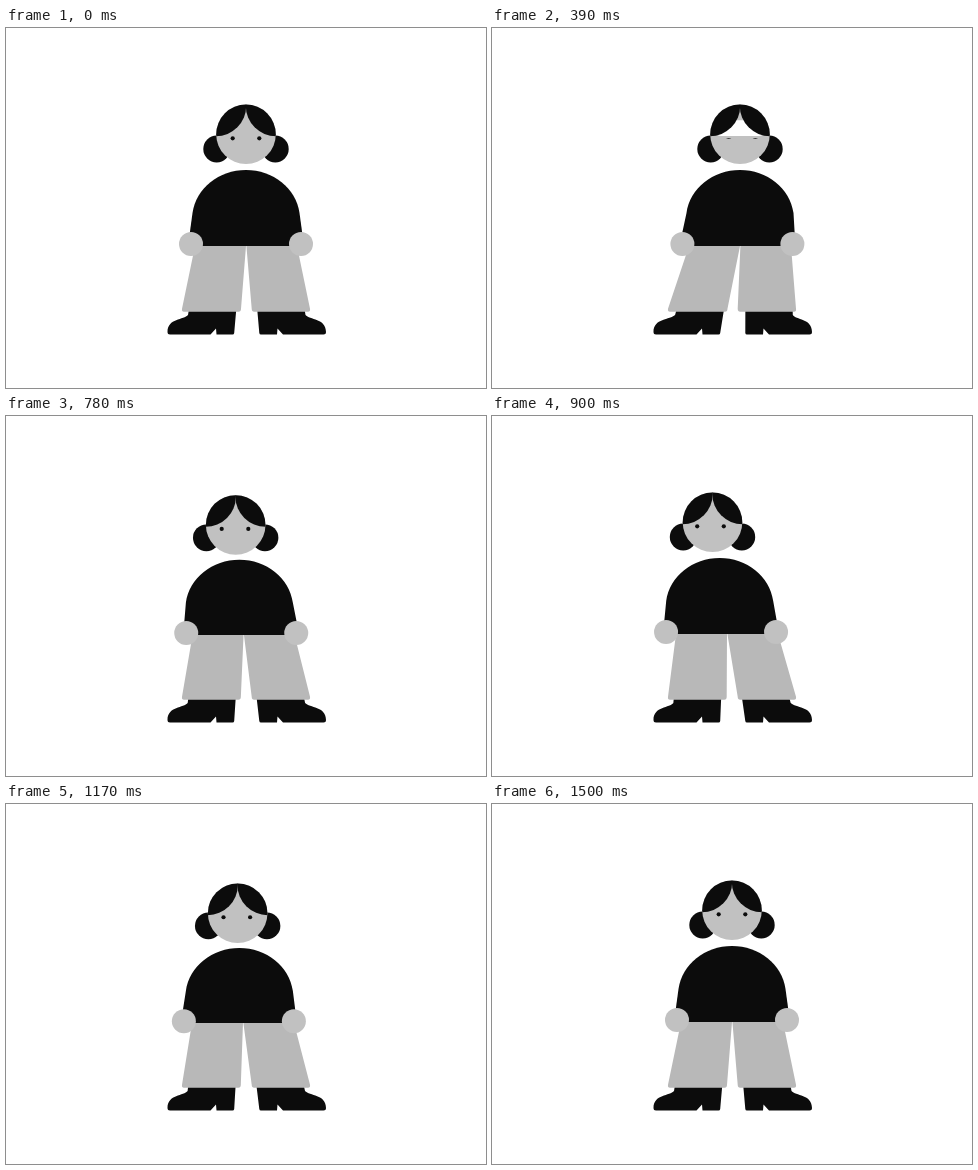
An HTML page with a canvas for the animation above (1530 ms loop, 480 by 360 pixels).

```html
<!DOCTYPE html>
<html lang="en">
<head>
<meta charset="utf-8">
<title>Swaying figure</title>
<style>
  html, body { margin: 0; width: 480px; height: 360px; overflow: hidden; background: #fff; }
  canvas { display: block; }
</style>
</head>
<body>
<canvas id="stage" width="480" height="360"></canvas>
<script>
const ctx = document.getElementById('stage').getContext('2d');
const LOOP = 1530, STEP = 30, MOVE = 310;
const BLACK = '#0c0c0c', SKIN = '#c1c1c1', CLOTH = '#b8b8b8', WHITE = '#fff';

const clamp = v => Math.max(0, Math.min(1, v));
const smooth = v => v * v * (3 - 2 * v);
const mix = (a, b, v) => a + (b - a) * v;

// Centre, lean right, lean left, centre; each part has its own start times.
function sway(t, right, left, starts) {
  const [a, b, c] = starts.map(s => smooth(clamp((t - s) / MOVE)));
  return right * a + (left - right) * b - left * c;
}

function dip(t) {
  return [0, 590, 1000].reduce((sum, s) =>
    sum + Math.sin(Math.PI * clamp((t - s) / MOVE)) ** 2, 0);
}

function circle(x, y, r, color) {
  ctx.fillStyle = color;
  ctx.beginPath();
  ctx.arc(x, y, r, 0, Math.PI * 2);
  ctx.fill();
}

function mirrored(draw) {
  draw();
  ctx.save();
  ctx.translate(481.5, 0);
  ctx.scale(-1, 1);
  draw(true);
  ctx.restore();
}

function shoe(shift) {
  ctx.fillStyle = BLACK;
  ctx.beginPath();
  ctx.moveTo(183 + shift, 281);
  ctx.lineTo(182 + shift * 0.6, 287);
  ctx.bezierCurveTo(178, 292, 161.5, 290, 161.5, 304);
  ctx.quadraticCurveTo(161.5, 306.5, 164, 306.5);
  ctx.lineTo(204.5, 306.5);
  ctx.lineTo(210, 300.5);
  ctx.lineTo(210.5, 306.5);
  ctx.lineTo(226.5, 306.5);
  ctx.quadraticCurveTo(228, 306.5, 228.2, 305);
  ctx.lineTo(230.3 + shift, 281);
  ctx.fill();
}

function leg(topOuter, topInner, bottomOuter, bottomInner, waist) {
  const y = 283.8, d = Math.sign(bottomInner - bottomOuter) * 2.5;
  ctx.fillStyle = CLOTH;
  ctx.beginPath();
  ctx.moveTo(topOuter, waist);
  ctx.lineTo(bottomOuter + d * 0.2, y - 3);
  ctx.quadraticCurveTo(bottomOuter, y, bottomOuter + d, y);
  ctx.lineTo(bottomInner - d, y);
  ctx.quadraticCurveTo(bottomInner, y, bottomInner, y - 3);
  ctx.lineTo(topInner, waist);
  ctx.fill();
}

function torso(x, top, waist, handX) {
  const side = top + 43;
  ctx.fillStyle = BLACK;
  ctx.beginPath();
  ctx.moveTo(182 + handX, waist);
  ctx.lineTo(x - 53.5, side);
  ctx.bezierCurveTo(x - 50, top + 18, x - 27, top, x, top);
  ctx.bezierCurveTo(x + 27, top, x + 50, top + 18, x + 53.5, side);
  ctx.lineTo(298 + handX, waist);
  ctx.fill();
}

// Forehead highlight: time, top, bottom, half width.
const GLOW = [
  [60, 80, 96, 4], [210, 80, 112.5, 11], [360, 92, 108, 23],
  [480, 93, 108, 23], [660, 94, 97, 4]
];

function highlight(t, x, y) {
  const i = GLOW.findIndex((k, n) => n && t >= GLOW[n - 1][0] && t <= k[0]);
  if (i < 1) return;
  const a = GLOW[i - 1], b = GLOW[i], v = (t - a[0]) / (b[0] - a[0]);
  const [top, bottom, half] = [1, 2, 3].map(n => mix(a[n], b[n], v));
  ctx.fillStyle = WHITE;
  ctx.beginPath();
  ctx.roundRect(x - half, y + top, half * 2, bottom - top, Math.min(4, half / 2));
  ctx.fill();
}

function head(t, x, dy) {
  const r = 29.8, cy = 106.3 + dy;
  circle(x - 29.3, 121 + dy * 0.3, 13.4, BLACK);
  circle(x + 29.3, 121 + dy * 0.3, 13.4, BLACK);
  circle(x, cy, r, SKIN);
  ctx.save();
  ctx.beginPath();
  ctx.arc(x, cy, r, 0, Math.PI * 2);
  ctx.clip();
  highlight(t, x, dy);
  circle(x - 30, 78 + dy, 30.2, BLACK);
  circle(x + 30, 78 + dy, 30.2, BLACK);
  ctx.restore();

  const look = sway(t, 2, -2, [0, 590, 1000]);
  const open = 1 - clamp(1.5 - Math.abs(t - 390) / 60);
  ctx.fillStyle = BLACK;
  for (const side of [-13.3, 13.3]) {
    ctx.beginPath();
    ctx.ellipse(x + look + side, 110.3 + dy, mix(2.6, 2.1, open), mix(0.4, 2.1, open), 0, 0, Math.PI * 2);
    ctx.fill();
  }
}

function draw(t) {
  ctx.fillStyle = WHITE;
  ctx.fillRect(0, 0, 480, 360);

  const drop = dip(t);
  const hip = sway(t, 8, -5, [0, 558, 1037]);
  const chest = sway(t, 8, -12.3, [-10, 578, 1023].map(s => Math.max(0, s)));
  const hand = sway(t, 5.4, -11, [34, 600, 1046]);
  const headX = sway(t, 8, -19.5, [0, 590, 1000]);
  const waist = 218 + drop, center = 240 + hip;

  mirrored(flip => shoe(hip * (flip ? -0.27 : 0.22)));
  leg(center - 51, center, 175.5, 235 + hip * 0.06, waist);
  leg(center + 51, center + 0.4, 304.5, 245.7, waist);
  torso(240 + chest, 142 + drop * 2, waist, hand);
  circle(185 + hand, 216 + drop * 1.2, 12, SKIN);
  circle(295 + hand, 216 + drop * 1.2, 12, SKIN);
  head(t, 240 + headX, drop * 3);
}

const start = performance.now();
function frame() {
  const t = (performance.now() - start) % LOOP;
  draw(Math.floor(t / STEP) * STEP);
  requestAnimationFrame(frame);
}
frame();
</script>
</body>
</html>
```
